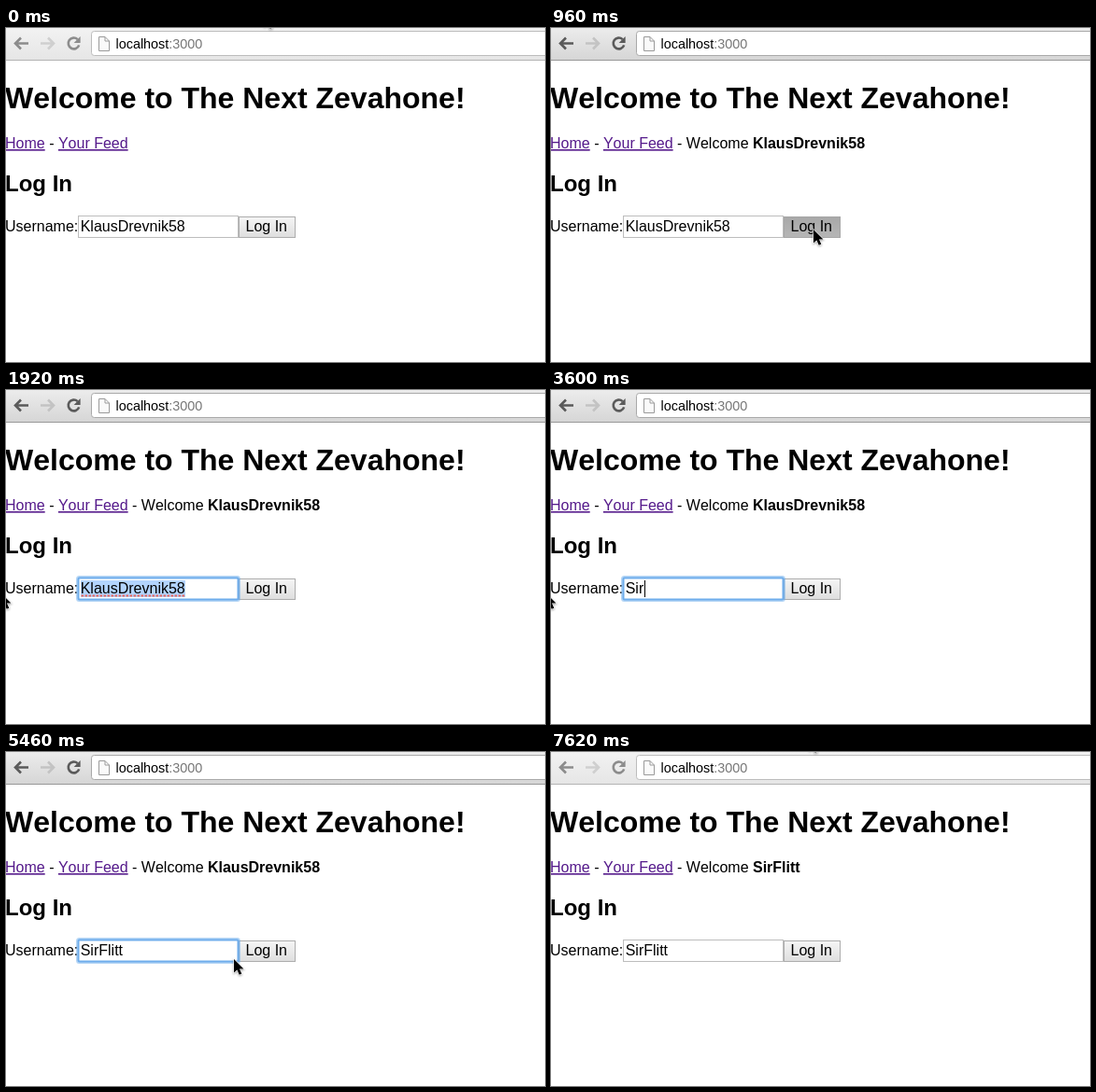
Recreate the animation shown at these times as an HTML page. Size 577 by 358 pixels, loop 7.68 s.

```html
<!DOCTYPE html>
<html lang="en">
<head>
<meta charset="utf-8">
<title>Log in demo</title>
<style>
  html, body { margin: 0; width: 577px; height: 358px; overflow: hidden; background: #fff; }
  svg { display: block; font: 16px "Liberation Sans", Arial, sans-serif; font-kerning: none; }
  .bold { font-weight: bold; }
  .link { fill: #551a8b; text-decoration: underline; }
  .icon { fill: none; stroke: #5a5a5a; stroke-width: 2.6; }
  .icon .head { fill: #5a5a5a; stroke: none; }
  .idle .icon { stroke: #8c8c8c; }
  .idle .icon .head { fill: #8c8c8c; }
  .icon.off { stroke: #c3c3c3; }
  .idle .icon.off { stroke: #cfcfcf; }
  .bar { fill: url(#barOn); }
  .idle .bar { fill: url(#barIdle); }
  .edge { fill: #989898; }
  .idle .edge { fill: #b4b4b4; }
  .address { fill: #fff; stroke: #a9a9a9; }
  .idle .address { stroke: #bcbcbc; }
</style>
</head>
<body>
<svg width="577" height="358" viewBox="0 0 577 358">
  <defs>
    <linearGradient id="barOn" x2="0" y2="1"><stop stop-color="#ececec"/><stop offset="1" stop-color="#d6d6d6"/></linearGradient>
    <linearGradient id="barIdle" x2="0" y2="1"><stop stop-color="#f2f2f2"/><stop offset="1" stop-color="#e6e6e6"/></linearGradient>
    <linearGradient id="face" x2="0" y2="1"><stop stop-color="#f5f5f5"/><stop offset="1" stop-color="#dedede"/></linearGradient>
    <linearGradient id="down" x2="0" y2="1"><stop stop-color="#a8a8a8"/><stop offset="1" stop-color="#b6b6b6"/></linearGradient>
  </defs>

  <g id="toolbar">
    <rect class="bar" width="577" height="34"/>
    <rect class="edge" y="34" width="577" height="1"/>
    <path class="icon" d="M24 16.5H10.5M16 10.5L10 16.5L16 22.5"/>
    <path class="icon off" d="M37 16.5H50.5M45 10.5L51 16.5L45 22.5"/>
    <g class="icon">
      <path d="M76.6 12.1A5.9 5.9 0 1 0 78.2 18.4"/>
      <path class="head" d="M79.6 9V16H72.6Z"/>
    </g>
    <rect class="address" x="91.5" y="3.5" width="500" height="26" rx="3"/>
    <path d="M99.5 9.5H106L110.5 14V24.5H99.5ZM106 9.5V14H110.5" fill="#fafafa" stroke="#9a9a9a"/>
    <text x="117.5" y="22" font-size="14.4">localhost<tspan fill="#777">:3000</tspan></text>
  </g>

  <text class="bold" x="-1" y="86" font-size="32">Welcome to The Next Zevahone!</text>
  <text x="-1" y="129"><tspan class="link">Home</tspan> - <tspan class="link">Your Feed</tspan><tspan id="greeting"> - Welcome <tspan id="user" class="bold"></tspan></tspan></text>
  <text class="bold" x="-1" y="175" font-size="24">Log In</text>
  <text x="-1" y="218">Username:</text>

  <rect x="77.5" y="201.5" width="171" height="23" fill="#fff" stroke="#bdbdbd"/>
  <g id="button">
    <rect id="buttonFace" x="249.5" y="202.5" width="60" height="22"/>
    <text x="256.5" y="218">Log In</text>
  </g>
  <g id="ring" fill="none" stroke="#6fadec">
    <rect x="76.5" y="200.5" width="173" height="25" rx="2" stroke-width="3" opacity=".5"/>
    <rect x="77.5" y="201.5" width="171" height="23" rx="1" stroke-width="2"/>
  </g>
  <rect id="selection" y="204" height="18" fill="#b3d4fd"/>
  <path id="squiggle" d="M80.5 220.5H192" stroke="#e5665e" stroke-width="2" stroke-dasharray="2.6 1.4"/>
  <text id="field" x="79.7" y="218"></text>
  <rect id="caret" y="204" width="1" height="18"/>

  <g id="pointer">
    <path id="arrow" d="M0 0V14.5L3.4 11.4L5.7 16.8L8.3 15.7L6 10.5H10.5Z" stroke="#fff" stroke-width="1.2" paint-order="stroke"
      style="filter: drop-shadow(0 1px 1px rgba(0,0,0,.35))"/>
    <path id="beam" d="M-3 -7.5Q0 -7.5 0 -5.5V5.5Q0 7.5 -3 7.5M3 -7.5Q0 -7.5 0 -5.5M0 5.5Q0 7.5 3 7.5" fill="none" stroke="#333"/>
  </g>
</svg>

<script>
const LOOP = 7680, TICK = 60;
const FIRST = 'KlausDrevnik58', SECOND = 'SirFlitt';
const GRAB = 1620, CLEAR = 2580, BLUR = 5760;
const KEYS = [3240, 3360, 3600, 4200, 4320, 4500, 4620, 4740];
const BLINK = 480;

// Pointer tip: time, x, y
const PATH = [
  [60, 277, -16], [540, 281, 217], [720, 281, 217], [780, 281, 216],
  [1260, 281, 216], [GRAB, 194, 214], [1920, -5, 218],
  [5040, -5, 218], [5460, 244, 222], [5700, 258, 216],
  [6540, 258, 217], [6600, 258, 216], [7140, 277, -16]
];

const el = Object.fromEntries([...document.querySelectorAll('[id]')].map(e => [e.id, e]));
const show = (e, on) => { e.style.display = on ? '' : 'none'; };
const within = (t, a, b) => t >= a && t < b;

function pointerAt(t) {
  const i = PATH.findIndex(p => p[0] > t);
  if (i < 1) return (i ? PATH[PATH.length - 1] : PATH[0]).slice(1);
  const [t0, x0, y0] = PATH[i - 1], [t1, x1, y1] = PATH[i];
  const u = (t - t0) / (t1 - t0), k = u * u * (3 - 2 * u);
  return [x0 + (x1 - x0) * k, y0 + (y1 - y0) * k];
}

function draw(t) {
  const [x, y] = pointerAt(t);
  el.pointer.setAttribute('transform', `translate(${Math.round(x)} ${Math.round(y)})`);
  const overField = x > 80 && x < 246 && y > 203 && y < 219;
  show(el.beam, overField);
  show(el.arrow, !overField);

  el.toolbar.setAttribute('class', within(t, 780, 7620) ? '' : 'idle');
  const pressed = within(t, 900, 1140) || within(t, BLUR, 6000);
  el.buttonFace.setAttribute('fill', pressed ? 'url(#down)' : 'url(#face)');
  el.buttonFace.setAttribute('stroke', pressed ? '#a6a6a6' : '#adadad');

  show(el.greeting, t >= 960);
  el.user.textContent = t < 5940 ? FIRST : SECOND;

  const typed = KEYS.filter(k => k <= t);
  el.field.textContent = t < CLEAR ? FIRST : SECOND.slice(0, typed.length);
  const end = Math.round(80 + el.field.getComputedTextLength());

  show(el.ring, within(t, GRAB, BLUR));
  const selecting = within(t, GRAB, CLEAR);
  show(el.squiggle, selecting);
  show(el.selection, selecting);
  const left = Math.min(end, Math.max(80, x));
  el.selection.setAttribute('x', left);
  el.selection.setAttribute('width', end - left);

  const since = t - (typed.at(-1) ?? CLEAR);
  show(el.caret, within(t, CLEAR, BLUR) && since % (2 * BLINK) < BLINK);
  el.caret.setAttribute('x', end);
}

const start = performance.now();
function frame() {
  const t = (performance.now() - start) % LOOP;
  draw(Math.floor(t / TICK) * TICK);
  requestAnimationFrame(frame);
}
frame();
</script>
</body>
</html>
```
